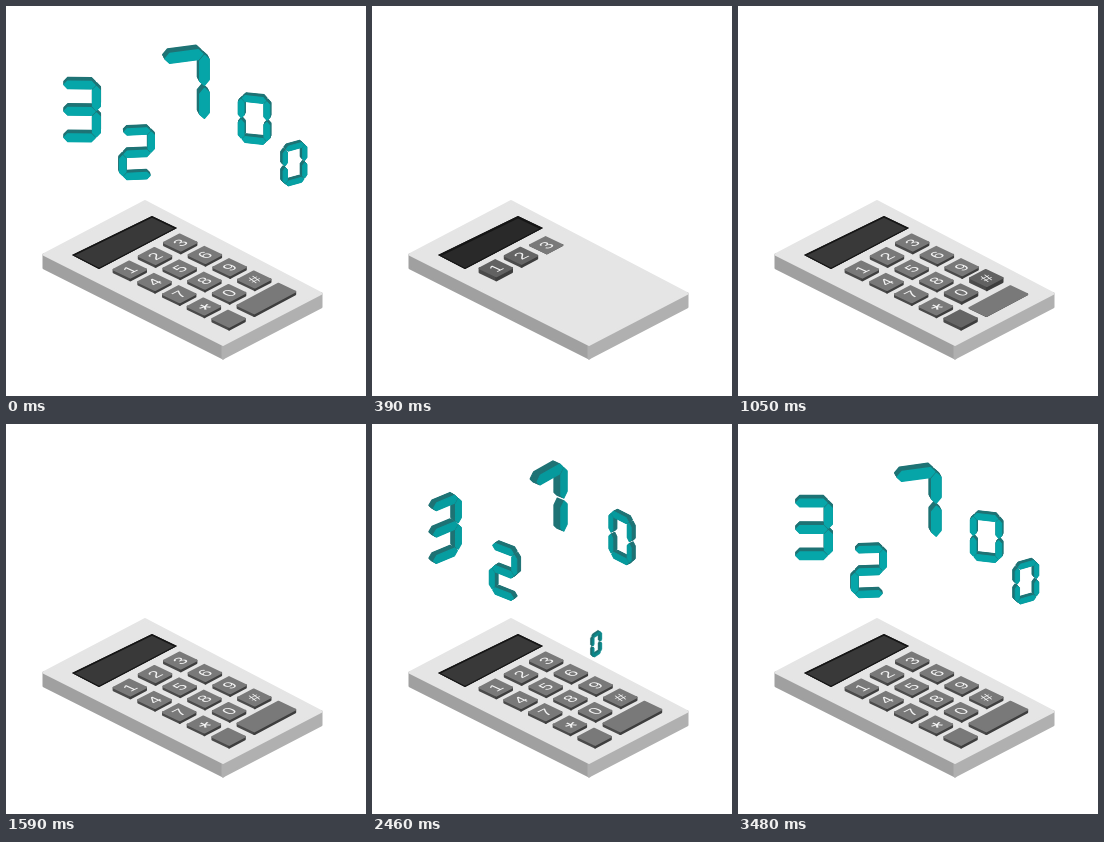
These frames come from a looping animation (360x390 px, 3.51 s). An HTML page with a canvas:

```html
<!DOCTYPE html>
<html>
<head>
<meta charset="utf-8">
<style>
html, body { margin: 0; width: 360px; height: 390px; overflow: hidden; background: #fff; }
canvas { display: block; }
</style>
</head>
<body>
<canvas id="stage" width="360" height="390"></canvas>
<script>
const ctx = document.getElementById('stage').getContext('2d');
const LOOP = 3510;
const clamp = x => Math.max(0, Math.min(1, x));
const grey = v => `rgb(${v},${v},${v})`;

function poly(points, color, round = 0) {
  ctx.beginPath();
  points.forEach(([x, y]) => ctx.lineTo(x, y));
  ctx.closePath();
  ctx.fillStyle = ctx.strokeStyle = color;
  ctx.fill();
  if (round) {
    ctx.lineWidth = round;
    ctx.stroke();
  }
}

const lift = (points, h) => points.map(([x, y]) => [x, y - h]);

// Base corners run top, right, bottom, left.
function prism(base, h, top, left, right, round) {
  const up = lift(base, h);
  if (h > 0) {
    poly([up[3], up[2], base[2], base[3]], left, round);
    poly([up[2], up[1], base[1], base[2]], right, round);
  }
  poly(up, top, round);
}

// Rises from 0 past 1, then settles at 1.
const pop = q => q + Math.sin(Math.PI * q);

const BODY = [[139, 209], [315, 301], [217, 352], [38, 262]];
const SCREEN = [[146, 210], [171, 222], [93, 263], [66, 249]];

function drawScreen(t) {
  if (t < 210) return;
  const q = clamp((t - 210) / 220);
  ctx.save();
  poly(SCREEN, '#161616');
  ctx.clip();
  poly(lift(SCREEN, -1.8 * pop(q)), grey(Math.round(57 - 30 * Math.sin(Math.PI * q))));
  ctx.strokeStyle = '#161616';
  ctx.lineWidth = 2;
  ctx.beginPath();
  SCREEN.forEach(([x, y]) => ctx.lineTo(x, y));
  ctx.closePath();
  ctx.stroke();
  ctx.restore();
}

function drawKey(label, col, row, halfCol, start, t) {
  if (t < start) return;
  const q = clamp((t - start) / 200);
  const h = 2.6 * pop(q);
  const x = 123.8 + 25.2 * col + 24.7 * row;
  const y = 266.2 - 13.5 * col + 12.3 * row;
  const ax = 7.8 + 12.6 * halfCol, ay = -4.1 - 6.75 * halfCol;
  const bx = 8.4, by = 4;
  const base = [[x + ax - bx, y + ay - by], [x + ax + bx, y + ay + by],
                [x - ax + bx, y - ay + by], [x - ax - bx, y - ay - by]];
  const face = grey(Math.round(121 - 24 * Math.sin(Math.PI * q)));
  prism(base, h, face, '#4b4b4b', '#3e3e3e', 2);
  ctx.save();
  ctx.transform(1, -0.5, 0.92, 0.42, x, y - h);
  ctx.fillStyle = '#f4f4f4';
  ctx.textAlign = 'center';
  const star = label === '*';
  ctx.font = `${star ? 24 : 15}px "Liberation Sans", Arial, sans-serif`;
  ctx.fillText(label, 0, star ? 13 : 5.3);
  ctx.restore();
}

// Seven-segment shapes in units of one segment height.
const W = 0.64;
const SEGMENTS = {
  a: [-W, -1, W, -1], b: [W, -1, W, 0], c: [W, 0, W, 1], d: [-W, 1, W, 1],
  e: [-W, 0, -W, 1], f: [-W, -1, -W, 0], g: [-W, 0, W, 0]
};

function digitPath(code) {
  const path = new Path2D();
  for (const name of code) {
    const [x1, y1, x2, y2] = SEGMENTS[name];
    const len = Math.hypot(x2 - x1, y2 - y1);
    const ux = (x2 - x1) / len, uy = (y2 - y1) / len;
    const gap = 0.05, half = 0.145;
    const at = (s, n) => [x1 + ux * s - uy * n, y1 + uy * s + ux * n];
    const near = gap + half, far = len - near;
    path.moveTo(...at(gap, 0));
    path.lineTo(...at(near, half));
    path.lineTo(...at(far, half));
    path.lineTo(...at(len - gap, 0));
    path.lineTo(...at(far, -half));
    path.lineTo(...at(near, -half));
    path.closePath();
  }
  return path;
}

// x, y, size, and the turn: start angle and time of a quarter swing
const DIGITS = [
  ['abgcd', 73.5, 105.4, 26.4, 53, 1880],
  ['abged', 131, 147.8, 22.3, -48, 1620],
  ['abc', 178, 83.5, 33, 53, 1880],
  ['abcdef', 248, 114, 20.5, -48, 1620],
  ['abcdef', 289, 158.2, 17.4, 53, 1880]
].map(([code, ...rest]) => [digitPath(code), ...rest]);

function drawDigit([path, x, y, size, angle, quarter], age) {
  if (age <= 0) return;
  const q = clamp(age / 300);
  const p = q * q * (3 - 2 * q);
  const turn = angle * Math.PI / 180 * Math.cos(Math.PI / 2 * age / quarter);
  const cos = Math.cos(turn), sin = Math.sin(turn);
  const s = size * (0.2 + 0.8 * p), depth = 0.28 * s;
  const cx = 172 + (x - 172) * p, cy = 272 + (y - 272) * p;
  const layer = (back, color) => {
    ctx.setTransform(cos * s, -sin / 2 * s, 0, s, cx - sin * back, cy - cos / 2 * back);
    ctx.fillStyle = ctx.strokeStyle = color;
    ctx.lineWidth = 0.05;
    ctx.fill(path);
    ctx.stroke(path);
  };
  ctx.save();
  ctx.globalAlpha = clamp(p * 1.4);
  for (let i = 8; i > 0; i--) layer(depth * i / 8, '#1f7375');
  layer(0, `rgb(6,${126 + 40 * cos},${129 + 40 * cos})`);
  ctx.restore();
}

function draw(time) {
  const t = time < 30 ? LOOP : time;
  ctx.fillStyle = '#fff';
  ctx.fillRect(0, 0, 360, 390);
  ctx.lineJoin = 'round';
  prism(BODY, 13.5 * pop(clamp((t - 30) / 200)), '#e5e5e5', '#a0a0a0', '#b0b0b0', 3);
  drawScreen(t);
  // Far keys first, so raised near keys overlap them.
  for (let row = 0; row < 4; row++) {
    for (let col = 2; col >= 0; col--) {
      const i = row * 3 + col;
      drawKey('123456789*0#'[i], col, row, 0, 270 + 60 * i, t);
    }
  }
  drawKey('', 1.5, 4, 1, 1050, t);
  drawKey('', 0, 4, 0, 990, t);
  DIGITS.forEach((digit, i) => drawDigit(digit, t - 1600 - 180 * i));
}

const begin = performance.now();
function tick() {
  draw((performance.now() - begin) % LOOP);
  requestAnimationFrame(tick);
}
tick();
</script>
</body>
</html>
```
